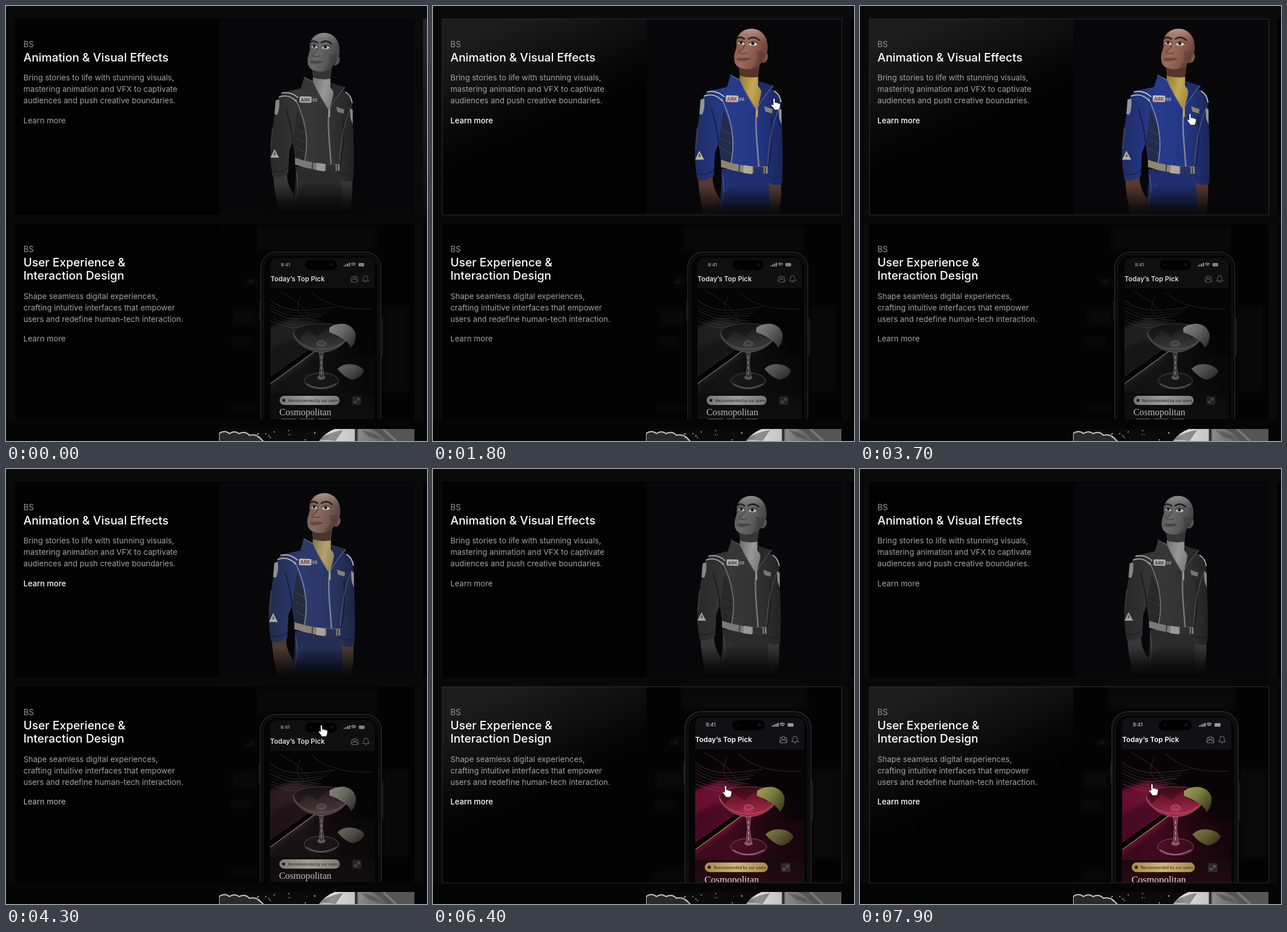
Animation, 737 px wide and 760 px high, one loop 8000 ms. Source, as an HTML page:

```html
<!DOCTYPE html>
<html lang="en">
<head>
<meta charset="utf-8">
<title>Programs</title>
<style>
html, body { margin: 0; width: 100%; height: 100%; overflow: hidden; background: #0a0a0b; }
svg { display: block; width: 737px; height: 760px; }
text { font-family: Inter, "Liberation Sans", sans-serif; }
.tag { font-size: 14px; fill: #949494; }
.title { font-size: 20.300px; font-weight: 500; fill: #fff; }
.copy { font-size: 13.700px; fill: #a3a3a3; }
.line { fill: none; stroke-linecap: round; stroke-linejoin: round; }
.soft { filter: blur(3px); }
</style>
</head>
<body>
<svg viewBox="0 0 737 760">
<defs>
  <linearGradient id="glow" gradientUnits="userSpaceOnUse" x1="110" y1="0" x2="205" y2="215">
    <stop stop-color="#1d1d1e"/><stop offset=".5" stop-color="#0d0d0e"/><stop offset="1" stop-color="#020203" stop-opacity="0"/>
  </linearGradient>
  <linearGradient id="edge" x2="0" y2="1"><stop stop-color="#262626"/><stop offset="1" stop-color="#0c0c0c"/></linearGradient>
  <linearGradient id="skin" x1=".05" x2="1" y2=".4"><stop stop-color="#7d5145"/><stop offset=".45" stop-color="#9a6c5e"/><stop offset=".75" stop-color="#87594c"/><stop offset="1" stop-color="#6b453b"/></linearGradient>
  <linearGradient id="scalp" x2=".3" y2="1"><stop stop-color="#c0a69d"/><stop offset="1" stop-color="#9a6c5e" stop-opacity="0"/></linearGradient>
  <linearGradient id="cloth"><stop stop-color="#1e2c68"/><stop offset=".4" stop-color="#283c8e"/><stop offset=".75" stop-color="#233580"/><stop offset="1" stop-color="#192659"/></linearGradient>
  <linearGradient id="knit" x2="1" y2=".4"><stop stop-color="#8f7a34"/><stop offset=".6" stop-color="#c5a950"/><stop offset="1" stop-color="#a68c3f"/></linearGradient>
  <linearGradient id="fade" x2="0" y2="1"><stop stop-color="#070709" stop-opacity="0"/><stop offset=".7" stop-color="#070709" stop-opacity=".8"/><stop offset="1" stop-color="#070709"/></linearGradient>
  <linearGradient id="table" x1="0" y1=".7" x2=".9" y2=".5"><stop stop-color="#5d0c2b"/><stop offset=".4" stop-color="#6f1033"/><stop offset=".75" stop-color="#22060f"/><stop offset="1" stop-color="#0b0406"/></linearGradient>
  <linearGradient id="drink" x2=".2" y2="1"><stop stop-color="#2c0812"/><stop offset=".4" stop-color="#6d152c"/><stop offset="1" stop-color="#a02a48"/></linearGradient>
  <linearGradient id="lime" x2="1" y2=".7"><stop stop-color="#a3a060"/><stop offset=".5" stop-color="#7c7c3f"/><stop offset="1" stop-color="#3f4020"/></linearGradient>
  <linearGradient id="gold"><stop stop-color="#a98b4c"/><stop offset=".5" stop-color="#d0b577"/><stop offset="1" stop-color="#a98b4c"/></linearGradient>
  <linearGradient id="panel" x2="0" y2="1"><stop stop-color="#160a0e" stop-opacity=".8"/><stop offset="1" stop-color="#2b0b17" stop-opacity=".95"/></linearGradient>
  <linearGradient id="orb"><stop stop-color="#888"/><stop offset=".2" stop-color="#dcdcdc"/><stop offset=".52" stop-color="#c4c4c4"/><stop offset=".54" stop-color="#161616"/><stop offset=".58" stop-color="#8a8a8a"/><stop offset="1" stop-color="#555"/></linearGradient>
  <clipPath id="top"><rect x="374" y="23" width="341" height="342"/></clipPath>
  <clipPath id="low"><rect x="374" y="381" width="341" height="341"/></clipPath>
  <clipPath id="strip"><rect x="373" y="739" width="342" height="21"/></clipPath>
  <clipPath id="photo"><rect x="463" y="493" width="182" height="240"/></clipPath>
</defs>

<rect width="737" height="760" fill="#0a0a0b"/>
<rect y="366" width="737" height="14" fill="#080809"/>
<rect y="723" width="737" height="37" fill="#050506"/>
<rect x="730" y="22" width="7" height="343" fill="#020203"/>
<rect id="side" x="730" y="22" width="7" height="343" fill="url(#edge)"/>
<rect x="730" y="380" width="7" height="343" fill="#040405"/>

<g id="cards"></g>

<g clip-path="url(#top)">
<rect x="374" y="23" width="341" height="342" fill="#070709"/>
<g id="hero">
  <!-- hands -->
  <path d="M468 292L492 288C491 310 499 325 510 336L513 358L478 358C474 340 469 325 468 292ZM583 300L606 300C607 320 606 342 602 358L584 358Z" fill="#573930"/>
  <!-- legs, torso, sleeves -->
  <path d="M507 280L583 284C587 310 588 330 588 360L498 360C506 330 508 305 507 280Z" fill="#1f2e70"/>
  <path d="M508 290C514 310 509 335 502 356" class="line" stroke="#666d80"/>
  <path d="M522 125L516 144L485 151C473 158 471 188 466 217C461 245 462 275 467 298C475 301 486 298 494 292L496 253L502 238L507 271C530 283 560 287 584 281L584 302C592 309 602 308 608 304C610 265 608 215 606 172C605 159 602 152 594 149L567 141Z" fill="url(#cloth)"/>
  <path d="M502 238C501 215 494 195 491 182M584 281C591 250 592 220 590 195" class="line" stroke="#141e4b" stroke-width="2"/>
  <path d="M510 182C528 215 526 245 521 276L508 270L503 235Z" fill="#222c4c"/>
  <path d="M507 163C528 205 530 245 521 278" class="line" stroke="#9a9b97" stroke-width="1.300"/>
  <path d="M508 215L525 224M508 230L525 239M507 246L523 255M512 318L520 304M505 335L516 322" class="line" stroke="#3f4863"/>
  <path d="M601 183C589 215 585 245 584 273" class="line" stroke="#5d6480" stroke-width="1"/>
  <path d="M466 287Q480 295 494 282M584 292Q596 298 608 292" class="line" stroke="#15204f" stroke-width="1.500"/>
  <!-- stripes and patches -->
  <path d="M483 152Q499 149 511 160M478 159Q496 153 508 167M595 151Q604 156 606 169" class="line" stroke="#bfc0bc" stroke-width="1.800"/>
  <path d="M472 165L478 163Q480 177 475 190L470 189ZM602 178L607 182L607 207L603 196Z" fill="#8d969e"/>
  <path d="M467 213L464 246" class="line" stroke="#453457" stroke-width="3" stroke-dasharray="3 2"/>
  <path d="M470 250L478 265L463 265Z" fill="#b9b59c"/>
  <path d="M470 254L473 260L468 261Z" fill="#536b60"/>
  <path d="M578 176L592 181L591 188L580 185Z" fill="#82856f"/>
  <!-- neck and knit collar -->
  <path d="M535 103L572 98L567 135L538 132Z" fill="#553529"/>
  <path d="M537 125Q552 130 568 127L568 143L574 150L566 184C557 168 545 153 538 141Z" fill="url(#knit)"/>
  <path d="M522 124L538 133C545 149 557 168 566 183C551 176 533 161 517 147Z" fill="#273a8b"/>
  <path d="M568 134L594 142L580 160L567 185Q575 163 573 151Z" fill="#1d2d6b"/>
  <path d="M522 124L538 133Q550 161 566 183Q570 169 593 142" class="line" stroke="#6a77a0"/>
  <path d="M566 181C562 207 567 244 569 276" class="line" stroke="#a7abb3" stroke-width="2.200"/>
  <path d="M566 183C562 207 567 244 569 276" class="line" stroke="#3d446a" stroke-width="1" stroke-dasharray="1 2"/>
  <path d="M566 181V194" stroke="#c4aa51" stroke-width="3"/>
  <rect x="514" y="158" width="21" height="11" rx="2" fill="#c4c1bb" transform="rotate(2 524 163)"/>
  <text x="516" y="167" font-size="8" font-weight="700" fill="#8f3738">ARK</text>
  <text x="536" y="167" font-size="7" font-weight="700" fill="#a5adb9">88</text>
  <!-- belt -->
  <path d="M506 265Q541 278 584 276L584 288Q543 290 506 277Z" fill="#8f8672"/>
  <path d="M544 274L558 276L558 289L543 287Z" fill="#b0a998"/>
  <path d="M560 276L577 277L577 289L560 288Z" fill="#25326a"/>
  <path d="M537 273L536 285M580 277V288" stroke="#3d404f" stroke-width="2"/>
  <!-- head -->
  <ellipse cx="578" cy="95" rx="6" ry="9" fill="#84574a" transform="rotate(18 578 95)"/>
  <path d="M579 90Q575 96 578 101" class="line" stroke="#452b24" stroke-width="1.300"/>
  <path d="M532 76C530 58 540 47 557 47C574 47 584 60 584 78C584 89 579 99 572 105C565 113 552 117 541 113C532 111 528 105 528 97C527 89 531 83 532 76Z" fill="url(#skin)"/>
  <path d="M534 64C539 51 549 47 558 47C572 48 581 58 584 74C566 62 548 60 534 64Z" fill="url(#scalp)"/>
  <path d="M564 84C570 92 567 104 556 115Q570 108 576 101Q580 92 578 84Z" fill="#4d3028" opacity=".35"/>
  <path d="M533 63Q539 59 545 64M552 64Q560 58 570 66" class="line" stroke="#2c1e1b" stroke-width="2.600"/>
  <path d="M534 71Q539 65 546 72Q540 76 534 71ZM552 73Q559 65 567 73Q560 78 552 73Z" fill="#d9d3cd"/>
  <circle cx="539.500" cy="70.500" r="2.400" fill="#251a18"/><circle cx="559" cy="71.500" r="2.700" fill="#251a18"/>
  <path d="M534 70Q539 65 546 71M552 72Q559 65 568 72" class="line" stroke="#39251f"/>
  <path d="M546 74Q541 83 536 84Q535 88 541 88Q547 90 549 86" class="line" stroke="#6a4135" stroke-width="1.500"/>
  <path d="M533 96Q537 93 541 95Q548 93 554 97Q546 104 535 101Z" fill="#84504a"/>
  <path d="M533 98Q544 99 554 97" class="line" stroke="#4c2d28" stroke-width="1.100"/>
  <rect x="450" y="308" width="180" height="52" fill="url(#fade)"/>
  <rect x="450" y="359" width="180" height="12" fill="#070709"/>
</g>
</g>

<g clip-path="url(#low)">
<rect x="374" y="381" width="341" height="341" fill="#030304"/>
<g id="phone">
  <path class="soft" d="M660 525H705V675H660ZM440 385H650V428H440ZM420 475H444V487H420ZM397 530H440V558H397ZM394 578H430V592H394ZM395 697H440V708H395Z" fill="#0a0909"/>
  <path d="M424 485V481M428 485V478M432 485V475" stroke="#1a1817" stroke-width="2"/>
  <rect x="443" y="515" width="3" height="35" fill="#1a1a1b"/><rect x="656" y="545" width="4" height="67" fill="#1a1a1b"/>
  <rect x="446" y="430" width="210" height="340" rx="27" fill="#0a0a0b" stroke="#242426" stroke-width="2"/>
  <rect x="451" y="435" width="200" height="340" rx="23" fill="#050506" stroke="#131314" stroke-width="2"/>
  <path d="M463 493V452Q463 440 477 440H630Q645 440 645 453V493Z" fill="#111113"/>
  <text x="481" y="455" font-size="8" font-weight="600" fill="#b5b5b5">9:41</text>
  <rect x="524" y="444" width="55" height="17" rx="8.500" fill="#000"/>
  <circle cx="570" cy="452" r="3" fill="#10131b"/><circle cx="534" cy="452" r="1.500" fill="#171717"/>
  <path d="M592 455V453M595 455V451.500M598 455V450M601 455V448.500" stroke="#aaa" stroke-width="2"/>
  <path d="M604 451Q608 447 612 451M606 453Q608 451 610 453" class="line" stroke="#aaa" stroke-width="1.500"/>
  <rect x="617" y="449" width="10" height="6" rx="1.500" fill="#999"/>
  <text x="463" y="481" font-size="11.700" font-weight="600" fill="#fff">Today’s Top Pick</text>
  <g class="line" stroke="#777">
    <circle cx="610" cy="474" r="2.500"/><path d="M605 482Q605 477 610 477Q615 477 615 482ZM607 473Q603 473 605 477Q603 478 604 481M613 473Q617 473 615 477Q617 478 616 481"/>
    <path d="M624 480Q626 478 626 475Q626 471 629 471Q633 471 633 475Q633 478 635 480ZM628 482H631"/>
  </g>
  <g clip-path="url(#photo)">
    <rect x="463" y="493" width="182" height="240" fill="#070405"/>
    <path d="M455 562L505 545L655 575V740H455Z" fill="url(#table)" class="soft"/>
    <path d="M463 600L500 582L541 593L463 650Z" fill="#30071a" opacity=".55" class="soft"/>
    <path d="M463 668L546 607L655 612V740H463Z" fill="#1f0711" opacity=".6" class="soft"/>
    <g id="cables" class="line"></g>
    <path d="M463 648L541 593L545 600L463 662Z" fill="#080406"/>
    <path d="M463 660L545 600" stroke="#9c8345" stroke-width="1.500"/>
    <!-- fruit -->
    <path d="M580 634Q590 624 606 626Q622 628 627 638Q622 650 606 653Q591 648 580 634Z" fill="url(#lime)" opacity=".75"/>
    <!-- glass -->
    <ellipse cx="552" cy="655" rx="30" ry="14" fill="#58102a" fill-opacity=".5" stroke="#8f666e" stroke-width=".8"/>
    <path d="M526 660Q550 675 578 660" class="line" stroke="#c3a0a7"/>
    <ellipse cx="552" cy="649" rx="7" ry="4" fill="#a8808a" opacity=".7"/>
    <path d="M548 603L550 625L548 647Q552 652 557 647L554 625L556 603Z" fill="#70354a" stroke="#a5767f" stroke-width=".6"/>
    <path d="M552 611V647" stroke="#dcbfc3" stroke-dasharray="6 3"/>
    <path d="M503 571C505 561 525 555 552 555C580 555 599 561 601 571C599 588 576 604 552 605C528 604 505 588 503 571Z" fill="url(#drink)"/>
    <path d="M512 584L528 566L545 578L563 562L580 580L592 574Q588 556 552 556Q514 556 506 571Z" fill="#3d0a18" opacity=".6"/>
    <ellipse cx="552" cy="592" rx="10" ry="7" fill="#b53b58" opacity=".55"/>
    <ellipse cx="552" cy="589" rx="7" ry="4" fill="none" stroke="#c9798a" stroke-width=".8"/>
    <path d="M503 571C505 561 525 555 552 555C580 555 599 561 601 571" class="line" stroke="#80545d" stroke-width=".7"/>
    <path d="M503 571C505 588 528 604 552 605C576 604 599 588 601 571M504 575Q518 599 552 600Q588 598 600 575" class="line" stroke="#a97b84" stroke-width=".8"/>
    <path d="M566 562Q575 555 590 555Q607 557 612 573Q613 588 604 597Q598 582 566 570Z" fill="url(#lime)"/>
    <path d="M463 677H645V733H463Z" fill="url(#panel)"/>
    <rect x="479" y="681" width="105" height="16" rx="8" fill="url(#gold)"/>
    <path id="star" fill="#17120a"/>
    <text x="494" y="691.500" font-size="6.600" fill="#2b210f">Recommended by our users</text>
    <rect x="606" y="682" width="16" height="15" rx="3" fill="#30282b"/>
    <path d="M615 686H618V689M618 686L611 693M610 690V693H613" class="line" stroke="#857f82" stroke-width=".9"/>
    <text x="478.500" y="715" font-size="16.200" fill="#f2dadd" style="font-family:'Liberation Serif',serif">Cosmopolitan</text>
    <path d="M482 722H508M515 722H540M547 722H568" stroke="#85797c" stroke-width="2"/>
  </g>
</g>
</g>

<g clip-path="url(#strip)">
  <rect x="373" y="739" width="342" height="21" fill="#0a0a0a"/>
  <path d="M373 747Q383 740 391 747Q400 741 408 747Q419 742 426 750Q439 747 448 758L452 762H373Z" fill="#2a2a2a" stroke="#c8c8c8" stroke-width="2"/>
  <g id="specks" fill="#ddd"></g>
  <path d="M613 739H715V760H613Z" fill="#555"/>
  <path d="M660 739L683 760" stroke="#777" stroke-width="4"/>
  <ellipse cx="607" cy="782" rx="66" ry="49" fill="url(#orb)"/>
  <path d="M548 757Q570 743 590 741L577 760ZM622 741Q646 744 656 757L636 753Z" fill="#444" opacity=".5"/>
</g>

<g id="words"></g>
<path id="pointer" d="M-1.500 1.500Q0-1 1.800 1.500V8Q4 6.500 5 8.500Q7 7 8 9.500Q11 8.500 11 12Q11 16 8.500 20.500H1Q-2 16-5 12.500Q-4 9.500-1.500 12Z" fill="#fff" stroke="#111" stroke-width=".8"/>
</svg>

<script>
const LOOP = 8000, STEP = 100;
const $ = id => document.getElementById(id);
const clamp = v => Math.max(0, Math.min(1, v));
const ease = (t, from, span) => {
  const p = clamp((t - from) / span);
  return p * p * (3 - 2 * p);
};

const cards = [
  { y: 22, title: ["Animation & Visual Effects"], rows: [97],
    copy: ["Bring stories to life with stunning visuals,", "mastering animation and VFX to captivate", "audiences and push creative boundaries."],
    copyY: 130, linkY: 204.5 },
  { y: 380, title: ["User Experience &", "Interaction Design"], rows: [455, 478],
    copy: ["Shape seamless digital experiences,", "crafting intuitive interfaces that empower", "users and redefine human-tech interaction."],
    copyY: 512, linkY: 585.5 }
];

const label = (cls, y, str, id = "") =>
  `<text class="${cls}" x="30.500" y="${y}" ${id && `id="${id}"`}>${str.replace("&", "&amp;")}</text>`;

$("cards").innerHTML = cards.map((c, i) => `
  <rect x="16" y="${c.y}" width="699" height="343" fill="#020203"/>
  <g id="lit${i}"><rect width="358" height="342" transform="translate(16 ${c.y})" fill="url(#glow)"/></g>`).join("");

$("words").innerHTML = cards.map((c, i) => `
  <rect id="rim${i}" x="16.500" y="${c.y + .5}" width="699" height="342.500" fill="none" stroke="#2e2e2f"/>
  ${label("tag", c.y + 50, "BS")}
  ${c.title.map((s, n) => label("title", c.rows[n], s)).join("")}
  ${c.copy.map((s, n) => label("copy", c.copyY + n * 20, s)).join("")}
  ${label("copy", c.linkY, "Learn more", "link" + i)}`).join("");

$("star").setAttribute("d", "M" + Array.from({ length: 10 }, (_, i) => {
  const a = i * Math.PI / 5, r = i % 2 ? 1.8 : 4;
  return `${(486.5 + r * Math.sin(a)).toFixed(1)} ${(689 - r * Math.cos(a)).toFixed(1)}`;
}).join("L") + "Z");

$("cables").innerHTML = Array.from({ length: 7 }, (_, i) => {
  const hue = ["#8d4468", "#54405f", "#9a6270"][i % 3];
  const y = 514 + i * 6;
  return `<path d="M463 ${y}C${490 + i * 5} ${y + 22},${520 - i * 4} ${y + 20 - i * 2},${575 - i * 7} ${526 + i * 5}"
    stroke="${hue}" stroke-width="${i % 3 ? .7 : 1.2}" opacity=".5"/>`;
}).join("") + `<path d="M478 498Q530 525 535 554M535 500Q570 533 640 529M516 508Q495 548 552 550" stroke="#3b2434"/>`;

let seed = 11;
const rnd = () => (seed = seed * 16807 % 2147483647) / 2147483647;
$("specks").innerHTML = Array.from({ length: 16 }, () =>
  `<circle cx="${440 + rnd() * 105}" cy="${740 + rnd() * 19}" r="${.4 + rnd() * .8}"/>`).join("");

// time, x, y of the fingertip
const path = [
  [0, 775, 140], [500, 742, 146], [700, 718, 150], [1300, 612, 165], [1700, 597, 161],
  [2200, 597, 161], [2700, 579, 168], [3600, 579, 170], [3800, 576, 205], [4100, 565, 362],
  [4300, 552, 447], [4700, 512, 553], [7200, 512, 553], [7500, 511, 550], [8000, 511, 550]
];
function tip(t) {
  const n = path.findIndex(p => p[0] > t), a = path[n - 1], b = path[n];
  const k = (t - a[0]) / (b[0] - a[0]);
  return [a[1] + (b[1] - a[1]) * k, a[2] + (b[2] - a[2]) * k];
}

function show(i, art, cy, hover, lit, dim) {
  art.setAttribute("transform", `translate(544 ${cy}) scale(${1 + .05 * hover}) translate(-544 ${-cy})`);
  art.style.filter = `grayscale(${1 - hover}) brightness(${dim + (1 - dim) * hover})`;
  $("lit" + i).style.opacity = $("rim" + i).style.opacity = lit;
  const shade = Math.round(163 + 92 * Math.min(1, hover * 1.5));
  $("link" + i).style.fill = `rgb(${shade},${shade},${shade})`;
  $("link" + i).style.fontWeight = hover > .5 ? 500 : 400;
}

function draw(t) {
  const first = ease(t, 700, 500) - ease(t, 4100, 500);
  const second = ease(t, 4170, 500);
  show(0, $("hero"), 194, first, t < 4200 ? ease(t, 900, 300) : 0, .9);
  show(1, $("phone"), 551, second, ease(t, 4400, 300), .85);
  $("side").style.opacity = 1 - ease(t, 200, 500);
  $("pointer").setAttribute("transform", `translate(${tip(t)})`);
}

const start = performance.now();
function tick() {
  const t = (performance.now() - start) % LOOP;
  draw(Math.floor(t / STEP) * STEP);
  requestAnimationFrame(tick);
}
tick();
</script>
</body>
</html>
```
